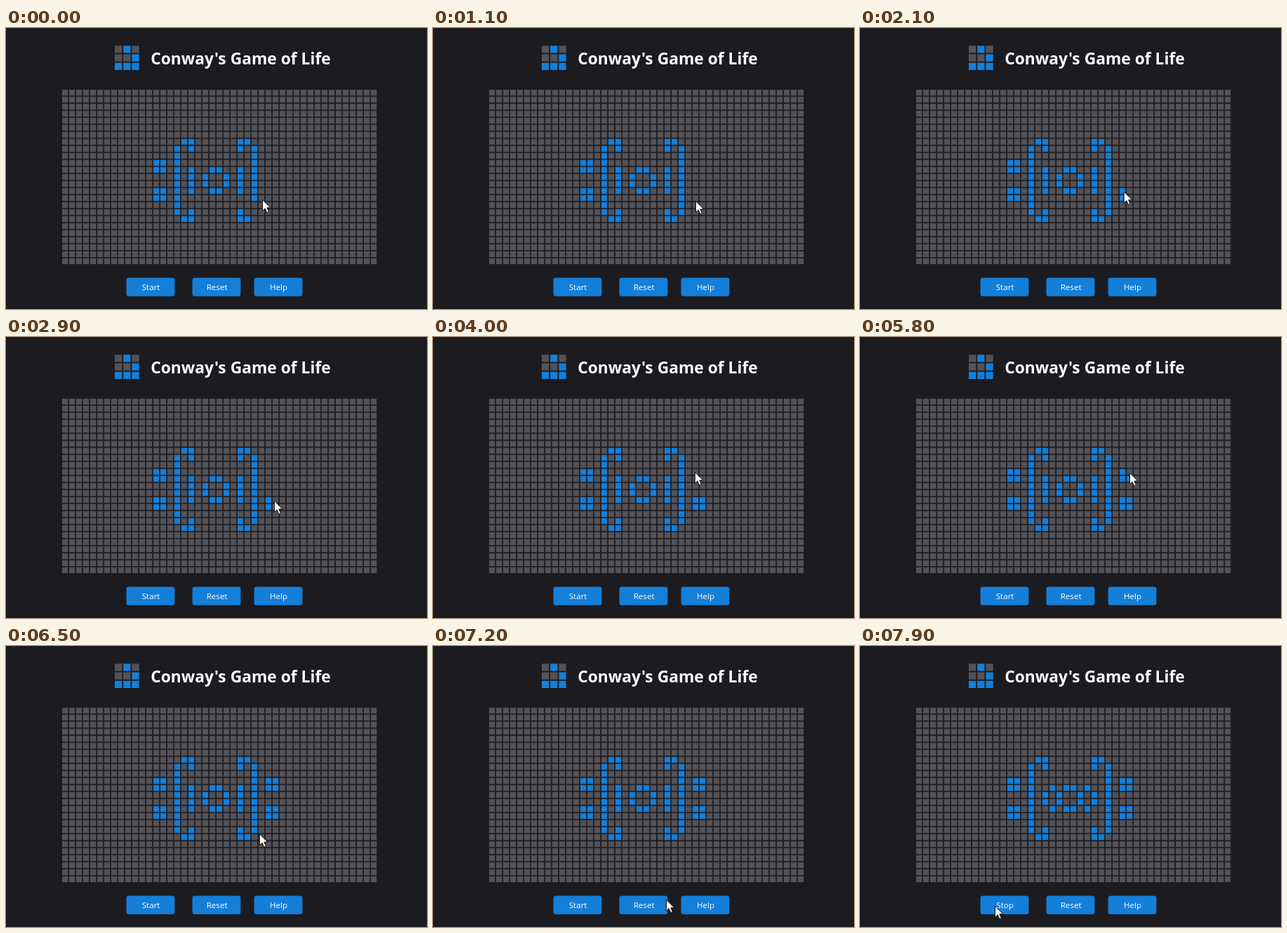
Recreate the animation shown at these times as an HTML page with a canvas. Size 600x401 px, loop 8 s.

```html
<!DOCTYPE html>
<html lang="en">
<head>
<meta charset="utf-8">
<title>Game of Life</title>
<style>
  html, body { margin: 0; width: 100%; height: 100%; overflow: hidden; background: #1c1b20; }
  canvas { display: block; width: 600px; height: 401px; }
</style>
</head>
<body>
<canvas id="stage"></canvas>
<script>
const LOOP = 8000, STEP = 100, STOP_AT = 7800, EVOLVE_AT = 7900;
const COLS = 45, ROWS = 25, PITCH_X = 10, PITCH_Y = 10.025, CELL = 8.3, LEFT = 80, TOP = 88.1;
const BG = '#1c1b20', GRAY = '#535257', BLUE = '#147fd9';
const FONT = '"Open Sans", "Noto Sans", sans-serif';

// Upper left quarter of the pattern; the rest is its mirror image.
const QUARTER = [
  '....##...',
  '...#.#...',
  '...#.....',
  '##.#.....',
  '##.#.#..#',
  '...#.#.#.'
];
const FIRST_COL = 13, FIRST_ROW = 7, LAST_COL = 30, LAST_ROW = 18;

// Pointer rests; leaving one switches on the cell below it if the pattern needs that cell.
const RESTS = [
  { arrive: 0, leave: 100, x: 366, y: 246 },
  { arrive: 300, leave: 300, x: 354, y: 253 },
  { arrive: 500, leave: 500, x: 353, y: 262 },
  { arrive: 600, leave: 700, x: 342, y: 263 },
  { arrive: 1100, leave: 1200, x: 375, y: 248 },
  { arrive: 1300, leave: 1400, x: 377, y: 240 },
  { arrive: 1800, leave: 2000, x: 376, y: 234 },
  { arrive: 2500, leave: 2700, x: 383, y: 241 },
  { arrive: 2900, leave: 3100, x: 383, y: 235 },
  { arrive: 4200, leave: 4700, x: 373, y: 190 },
  { arrive: 4800, leave: 5100, x: 373, y: 200 },
  { arrive: 5500, leave: 5500, x: 383, y: 200 },
  { arrive: 5600, leave: 5900, x: 385, y: 195 },
  { arrive: 7200, leave: 7200, x: 333, y: 363 },
  { arrive: 7700, leave: LOOP, x: 193, y: 372 }
];

const ARROW = [[0, 0], [0, 16], [3.7, 12.6], [6.3, 18.6], [9, 17.4], [6.4, 11.6], [11.3, 11.4]];

const canvas = document.getElementById('stage');
const ctx = canvas.getContext('2d');
const scale = window.devicePixelRatio || 1;
canvas.width = 600 * scale;
canvas.height = 401 * scale;
ctx.scale(scale, scale);

const key = (col, row) => row * COLS + col;
const keyUnder = ({ x, y }) =>
  key(Math.floor((x - LEFT) / PITCH_X), Math.floor((y - TOP) / PITCH_Y));

function fullPattern() {
  const cells = new Set();
  QUARTER.forEach((line, r) => [...line].forEach((mark, c) => {
    if (mark !== '#') return;
    for (const col of [FIRST_COL + c, LAST_COL - c])
      for (const row of [FIRST_ROW + r, LAST_ROW - r]) cells.add(key(col, row));
  }));
  return cells;
}

function evolve(cells) {
  const next = new Set();
  for (let row = 1; row < ROWS - 1; row++) {
    for (let col = 1; col < COLS - 1; col++) {
      let near = 0;
      for (let dy = -1; dy <= 1; dy++)
        for (let dx = -1; dx <= 1; dx++)
          if ((dx || dy) && cells.has(key(col + dx, row + dy))) near++;
      if (near === 3 || (near === 2 && cells.has(key(col, row)))) next.add(key(col, row));
    }
  }
  return next;
}

const complete = fullPattern();
const evolved = evolve(complete);

function cellsAt(time) {
  if (time >= EVOLVE_AT) return evolved;
  const cells = new Set(complete);
  for (const rest of RESTS) if (time < rest.leave) cells.delete(keyUnder(rest));
  return cells;
}

function tipAt(time) {
  const i = RESTS.findIndex(rest => rest.leave > time);
  const to = RESTS[i], from = RESTS[i - 1];
  if (time >= to.arrive) return to;
  const k = (time - from.leave) / (to.arrive - from.leave);
  const eased = k * k * (3 - 2 * k);
  return { x: from.x + (to.x - from.x) * eased, y: from.y + (to.y - from.y) * eased };
}

function square(x, y, size, on) {
  ctx.fillStyle = on ? BLUE : GRAY;
  ctx.fillRect(x, y, size, size);
}

function text(label, x, y, font, align) {
  ctx.font = `${font} ${FONT}`;
  ctx.textAlign = align;
  ctx.fillStyle = '#fff';
  ctx.fillText(label, x, y);
}

function button(x, label) {
  ctx.fillStyle = BLUE;
  ctx.beginPath();
  ctx.roundRect(x - 0.4, 356.4, 68.8, 26.4, 3);
  ctx.fill();
  text(label, x + 34.6, 374, '11.6px', 'center');
}

function pointer({ x, y }) {
  ctx.beginPath();
  for (const [dx, dy] of ARROW) ctx.lineTo(x + dx - 0.5, y + dy - 1);
  ctx.closePath();
  ctx.fillStyle = '#fff';
  ctx.fill();
  ctx.strokeStyle = '#111';
  ctx.lineWidth = 1;
  ctx.stroke();
}

function draw(time) {
  ctx.fillStyle = BG;
  ctx.fillRect(0, 0, 600, 401);

  [...'.#...####'].forEach((mark, i) =>
    square(155 + i % 3 * 12.2, 25.3 + Math.floor(i / 3) * 12.2, 10.3, mark === '#'));
  text("Conway's Game of Life", 206.2, 52, 'bold 22.8px', 'left');

  const cells = cellsAt(time);
  for (let row = 0; row < ROWS; row++)
    for (let col = 0; col < COLS; col++)
      square(LEFT + col * PITCH_X, TOP + row * PITCH_Y, CELL, cells.has(key(col, row)));

  button(172, time < STOP_AT ? 'Start' : 'Stop');
  button(266, 'Reset');
  button(354, 'Help');
  pointer(tipAt(time));
}

const start = performance.now();
function tick() {
  const time = (performance.now() - start) % LOOP;
  draw(Math.floor(time / STEP) * STEP);
  requestAnimationFrame(tick);
}
tick();
</script>
</body>
</html>
```
